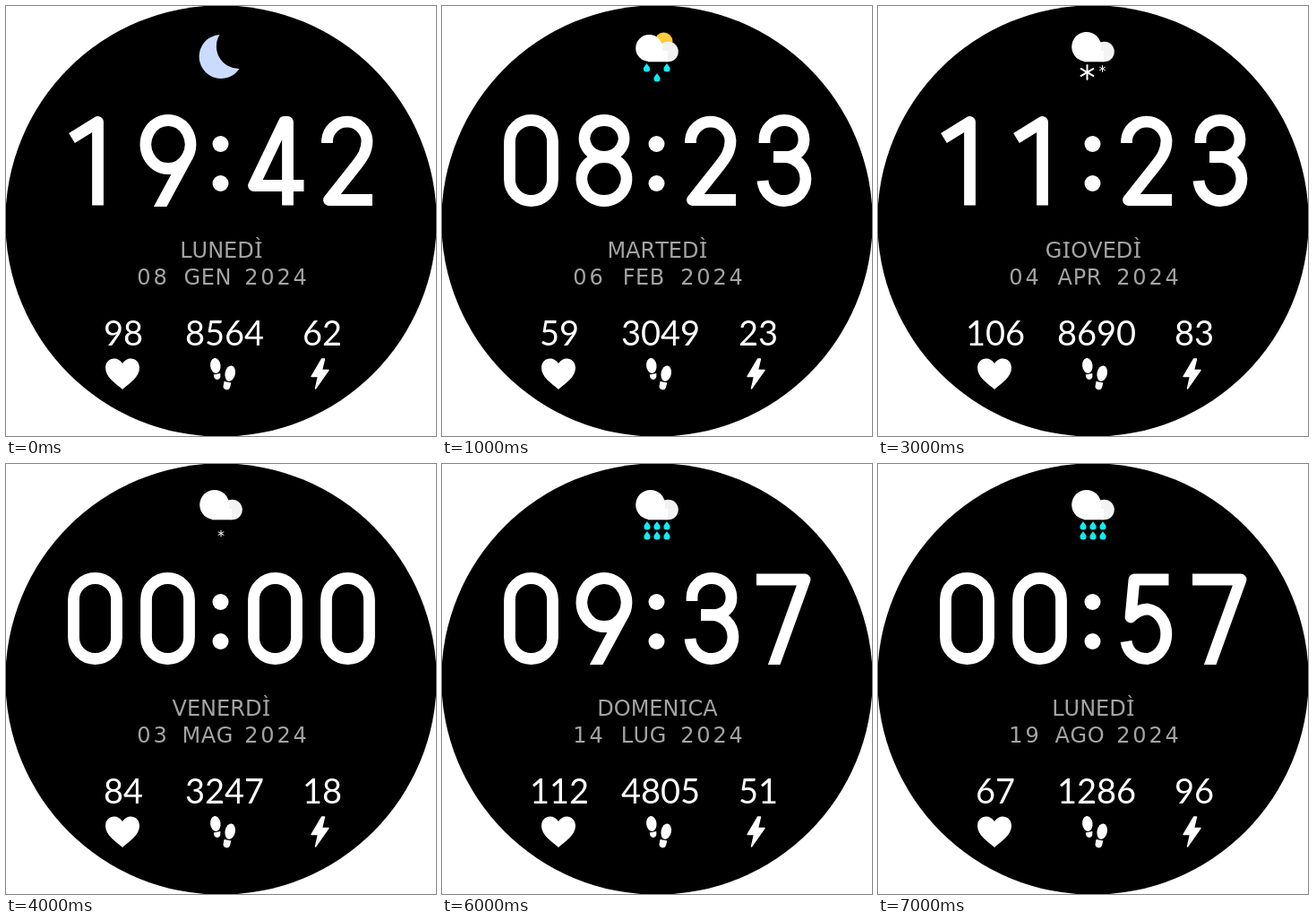
Recreate the animation shown at these times as an HTML page with a canvas. Size 480x480 px, loop 8 s.

```html
<!DOCTYPE html>
<html lang="it">
<head>
<meta charset="utf-8">
<style>
html, body { margin: 0; width: 100%; height: 100%; overflow: hidden; background: #fff; }
canvas { display: block; }
</style>
</head>
<body>
<canvas id="face" width="480" height="480"></canvas>
<script>
const ctx = document.getElementById('face').getContext('2d');

// icon, time, weekday, day, month, heart rate, steps, battery
const STATES = [
  ['moon', '19:42', 'LUNEDÌ', '08', 'GEN', 98, 8564, 62],
  ['showers', '08:23', 'MARTEDÌ', '06', 'FEB', 59, 3049, 23],
  ['storm', '15:34', 'MERCOLEDÌ', '20', 'MAR', 78, 5286, 45],
  ['snow', '11:23', 'GIOVEDÌ', '04', 'APR', 106, 8690, 83],
  ['flurry', '00:00', 'VENERDÌ', '03', 'MAG', 84, 3247, 18],
  ['wind', '03:28', 'SABATO', '22', 'GIU', 70, 678, 74],
  ['rain', '09:37', 'DOMENICA', '14', 'LUG', 112, 4805, 51],
  ['rain', '00:57', 'LUNEDÌ', '19', 'AGO', 67, 1286, 96],
];
const STEP = 1000;

// Centre lines of the large digits, in a cell 61 wide and 103 high
const DIGITS = {
  0: 'M6.5 30.5a24 24 0 0 1 48 0V72.5a24 24 0 0 1-48 0Z',
  1: 'M4.5 26.5L33.5 8.5V101.5',
  2: 'M7.5 32V29A22.3 22.3 0 0 1 52 29C52 42 46 49 40 57L9.5 95.5H58',
  3: 'M9 32V28A22 21.5 0 0 1 53 28C53 40 44 47.5 32 47.5H19M31 47.5A24 24.5 0 1 1 7 74',
  4: 'M62.5 79.5H6.5L40.5 8.5H44.5V101.5',
  5: 'M54.5 8H16L12 50C18 44 24 41 31 41A24 28 0 0 1 31 96.5C19 96.5 9 90 7 77',
  7: 'M0 8H54L18 107.7',
  8: 'M31 47.5a22 20.5 0 1 1 .1 0ZM31 47.5a25 24.5 0 1 1-.1 0Z',
  9: 'M31 6.5a25 27 0 1 1-.1 0ZM53.5 45L20.5 106',
};
const SLOTS = [69, 150, 0, 270, 351];

function fill(path, color = '#fff') {
  ctx.fillStyle = color;
  ctx.fill(new Path2D(path));
}

function stroke(path, width, color = '#fff') {
  ctx.lineWidth = width;
  ctx.lineJoin = 'round';
  ctx.strokeStyle = color;
  ctx.stroke(new Path2D(path));
}

function oval(x, y, rx, ry = rx, color = '#fff', turn = 0) {
  ctx.fillStyle = color;
  ctx.beginPath();
  ctx.ellipse(x, y, rx, ry, turn, 0, 7);
  ctx.fill();
}

function cloud(r = 16.5) {
  oval(252.5, 51, 11.3, 11.3, '#f3f3f3');
  fill('M230 50H252V62.3H230Z');
  oval(216.2 + r, 62 - r, r);
}

function drop(x, y) {
  fill(`M${x} ${y - 5}C${x + 1} ${y - 3} ${x + 3.6} ${y - 1} ${x + 3.6} ${y + 1}` +
    `a3.6 3.6 0 0 1-7.2 0C${x - 3.6} ${y - 1} ${x - 1} ${y - 3} ${x} ${y - 5}Z`, '#10ecf4');
}

function flake(x, y, r, width) {
  for (let i = 0; i < 3; i++) {
    const a = Math.PI * (i / 3 + 0.5), dx = r * Math.cos(a), dy = r * Math.sin(a);
    stroke(`M${x - dx} ${y - dy}L${x + dx} ${y + dy}`, width);
  }
}

const ICONS = {
  moon() {
    fill('M238.5 32A24.5 24.5 0 1 0 260.5 70A25 25 0 0 1 238.5 32Z', '#cbdbfe');
  },
  showers() {
    oval(247.5, 39.5, 10, 10, '#ffcb36');
    cloud(15);
    drop(228.5, 69);
    drop(251, 69);
    drop(240, 80);
  },
  storm() {
    cloud();
    fill('M240 64L232 75H239L236 85L247 72H240L244 64Z', '#ffcb36');
  },
  snow() {
    cloud();
    flake(233.5, 74, 8.7, 2);
    flake(250.5, 70, 3.8, 1);
  },
  flurry() {
    cloud();
    flake(240, 77.5, 3.8, 1);
  },
  wind() {
    const color = '#fff2c4';
    stroke('M216 49H236.5a5 5 0 0 0 0-10H231', 3.8, color);
    stroke('M216 56H257a5.2 5.2 0 0 1 0 11H254', 3.8, color);
    stroke('M216 64.5H227a5.2 5.2 0 0 1 0 10.5H223', 3.8, color);
  },
  rain() {
    cloud();
    for (const x of [229, 240, 251]) {
      drop(x, 69);
      drop(x, 80);
    }
  },
};

function drawTime(time) {
  ctx.save();
  ctx.beginPath();
  ctx.rect(0, 121, 480, 103); // cuts slanted strokes level with the line
  ctx.clip();
  [...time].forEach((c, i) => {
    if (c === ':') return;
    ctx.save();
    ctx.translate(SLOTS[i], 121);
    stroke(DIGITS[c], 12.8);
    ctx.restore();
  });
  ctx.restore();
  oval(239.5, 154, 9);
  oval(239.5, 198, 9);
}

// Centred grey text; the letter I gets wide serifs
function label(text, cx, y, spacing = 0) {
  const size = 24, isI = c => c === 'I' || c === 'Ì';
  ctx.font = `${size}px "DejaVu Sans", sans-serif`;
  ctx.textAlign = 'center';
  ctx.fillStyle = '#a4a4a4';
  const widths = [...text].map(c => isI(c) ? size * 0.42 : ctx.measureText(c).width);
  let x = cx - (widths.reduce((a, b) => a + b) + spacing * (text.length - 1)) / 2;
  [...text].forEach((c, i) => {
    const mid = x + widths[i] / 2;
    ctx.fillText(c, mid, y);
    if (isI(c)) {
      ctx.fillRect(mid - 3.5, y - 17.5, 7, 1.7);
      ctx.fillRect(mid - 3.5, y - 1.7, 7, 1.7);
    }
    x += widths[i] + spacing;
  });
}

function stat(value, cx) {
  ctx.font = '38px Lato, sans-serif';
  ctx.fontKerning = 'none';
  ctx.textAlign = 'center';
  ctx.fillStyle = '#fff';
  ctx.fillText(value, cx, 379);
}

function drawSymbols() {
  fill('M130 428C122 421 111 414 111 404C111 392 125 390 130 399C135 390 149 392 149 404C149 414 138 421 130 428Z');
  // footprints: soles, then heels
  oval(233.8, 401.5, 5.7, 8.6, '#fff', -0.12);
  oval(250.2, 410.2, 5.7, 8.8, '#fff', 0.2);
  fill('M231.8 411.5L239.3 410V413.5a3.6 3.6 0 0 1-7 1Z');
  fill('M243.5 419L251.3 420.5L250 426a3.9 3.9 0 0 1-7.5-1.5Z');
  const bolt = 'M352.5 394H355.5L352.5 406.5H360L345.5 427L348.5 413.5H341Z';
  fill(bolt);
  stroke(bolt, 1.4);
}

function draw() {
  const index = Math.floor(performance.now() / STEP) % STATES.length;
  const [icon, time, weekday, day, month, heart, steps, battery] = STATES[index];
  ctx.fillStyle = '#fff';
  ctx.fillRect(0, 0, 480, 480);
  oval(240, 240, 240.7, 240.7, '#000');
  ICONS[icon]();
  drawTime(time);
  label(weekday, 240.5, 281);
  label(day, 163, 311, 2.8);
  label(month, 225, 311, 0.6);
  label('2024', 301, 311, 2.8);
  stat(heart, 131);
  stat(steps, 244);
  stat(battery, 353);
  drawSymbols();
  requestAnimationFrame(draw);
}
draw();
</script>
</body>
</html>
```
